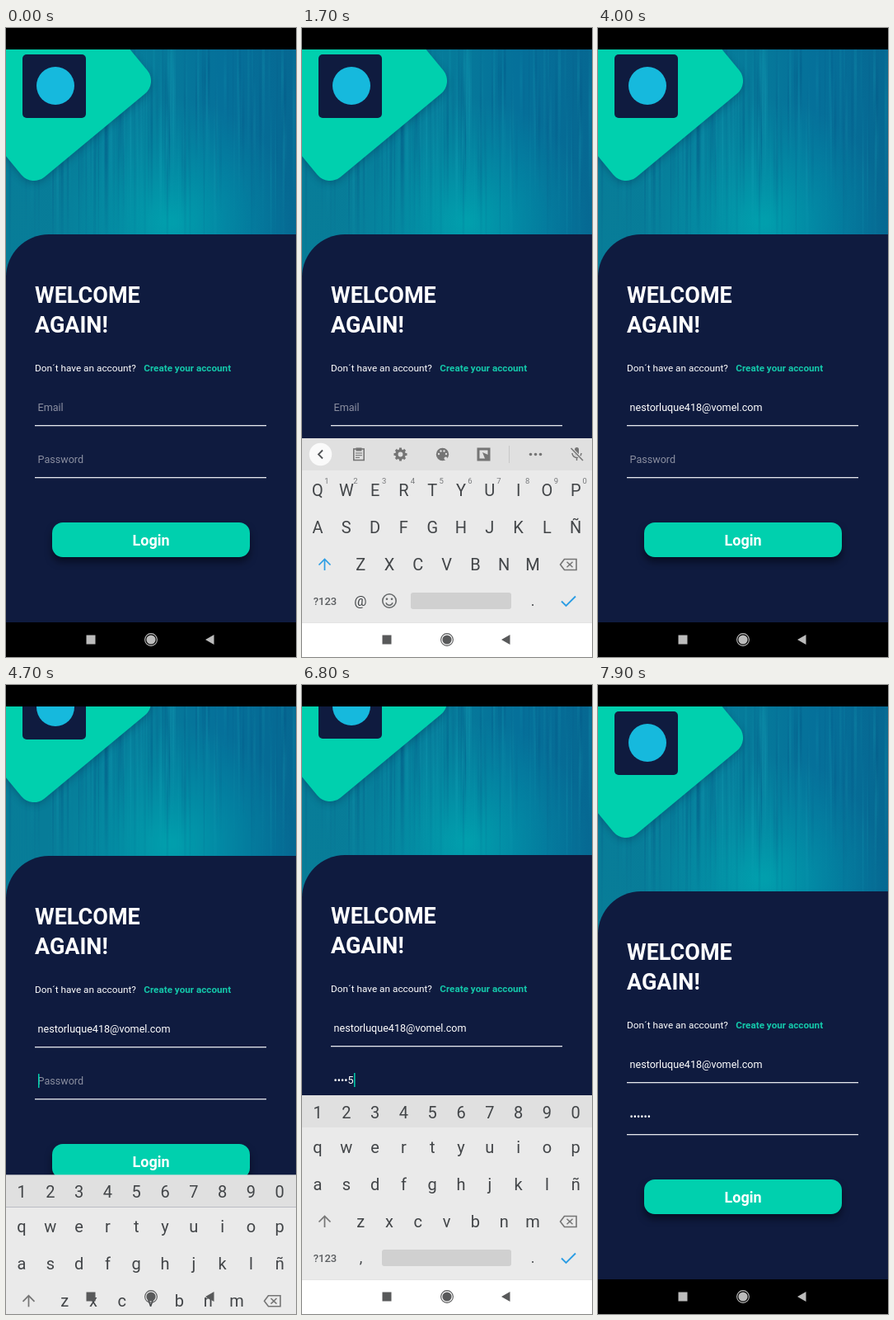
An HTML page with a canvas that plays this animation: 352x762 px, repeating every 8000 ms.

```html
<!DOCTYPE html>
<html lang="en">
<head>
<meta charset="utf-8">
<title>Login screen</title>
<style>
html, body { margin: 0; width: 100%; height: 100%; overflow: hidden; background: #000; }
canvas { display: block; width: 352px; height: 762px; }
</style>
</head>
<body>
<canvas id="stage" width="352" height="762"></canvas>
<script>
const W = 352, H = 762, LOOP = 8000;
const NAVY = '#0f1b3f', MINT = '#00d0ae', KEY = '#424548', ICON = '#757575', BLUE = '#2b9de4';
const USER = 'nestorluque418', HOST = '@vomel.com', EMAIL = USER + HOST;
const PIN = '123456';
const emailKeys = [1880, 2100, 2350], pickTime = 3080;
const pinKeys = [5450, 5700, 6000, 6400, 6760, 6880];
const KB_H = 265;

const ctx = document.getElementById('stage').getContext('2d');
let g = ctx;

const clamp = v => Math.max(0, Math.min(1, v));
const ramp = (t, a, b) => clamp((t - a) / (b - a));
const easeOut = u => 1 - (1 - u) * (1 - u);
const easeIn = u => u * u;
const smooth = u => u * u * (3 - 2 * u);

function text(s, x, y, size, color, weight = 400, align = 'left') {
  g.font = `${weight} ${size}px Roboto, sans-serif`;
  g.textAlign = align;
  g.fillStyle = color;
  g.fillText(s, x, y);
  return g.measureText(s).width;
}

function rect(x, y, w, h, color) {
  g.fillStyle = color;
  g.fillRect(x, y, w, h);
}

function round(x, y, w, h, r, color) {
  g.fillStyle = color;
  g.beginPath();
  g.roundRect(x, y, w, h, r);
  g.fill();
}

function disc(x, y, r, color) {
  g.fillStyle = color;
  g.beginPath();
  g.arc(x, y, r, 0, 7);
  g.fill();
}

function ring(x, y, r, color, w) {
  g.strokeStyle = color;
  g.lineWidth = w;
  g.beginPath();
  g.arc(x, y, r, 0, 7);
  g.stroke();
}

// Polyline from flat x,y pairs
function line(pts, color, w) {
  g.strokeStyle = color;
  g.lineWidth = w;
  g.beginPath();
  for (let i = 0; i < pts.length; i += 2) g.lineTo(pts[i], pts[i + 1]);
  g.stroke();
}

function shadow(color, blur, dy) {
  g.shadowColor = color;
  g.shadowBlur = blur;
  g.shadowOffsetY = dy;
}

function makeBackdrop() {
  const c = document.createElement('canvas');
  c.width = W;
  c.height = 300;
  const b = c.getContext('2d');
  let seed = 11;
  const rnd = () => (seed = (seed * 16807) % 2147483647) / 2147483647;
  const base = b.createLinearGradient(0, 0, W, 0);
  [[0, '#087d98'], [.5, '#067b9a'], [.75, '#05709a'], [1, '#066892']].forEach(s => base.addColorStop(...s));
  b.fillStyle = base;
  b.fillRect(0, 0, W, 300);
  const glow = b.createRadialGradient(200, 235, 5, 200, 235, 150);
  glow.addColorStop(0, 'rgba(0,165,176,.85)');
  glow.addColorStop(1, 'rgba(0,150,170,0)');
  b.fillStyle = glow;
  b.fillRect(0, 0, W, 300);
  for (let i = 0; i < 190; i++) {
    const x = rnd() * W, y = rnd() * 130 - 30, h = 90 + rnd() * 150;
    const rgb = rnd() < .55 ? '0,75,125' : '20,165,185';
    const s = b.createLinearGradient(0, y, 0, y + h);
    s.addColorStop(0, `rgba(${rgb},0)`);
    s.addColorStop(.45, `rgba(${rgb},${.08 + rnd() * .16})`);
    s.addColorStop(1, `rgba(${rgb},0)`);
    b.fillStyle = s;
    b.fillRect(x, y, 1 + rnd() * 2.5, h);
  }
  return c;
}
const backdrop = makeBackdrop();

function cursorOn(t, start, keys) {
  const last = [start, ...keys].filter(k => k <= t).pop();
  return last !== undefined && (t - last) % 1000 < 500;
}

function caret(x, base) {
  rect(x, base - 13, 1.5, 17, MINT);
}

function drawHeader() {
  g.drawImage(backdrop, 0, 0);
  g.save();
  g.translate(34, 165);
  g.rotate(-39.6 * Math.PI / 180);
  shadow('rgba(0,40,70,.3)', 8, 3);
  round(-20, -240, 198.4, 260, 20, MINT);
  g.restore();
  round(20, 32, 77, 77, 5, NAVY);
  disc(60, 70, 23, '#16b9dd');
}

function drawEmail(t) {
  const n = emailKeys.filter(k => k <= t).length;
  const done = t >= pickTime;
  const x = 38.5, y = 464;
  let w = 0;
  if (done) w = text(EMAIL, x, y, 12.6, '#fff');
  else if (n) {
    w = text('Nes'.slice(0, n), x, y, 12.6, '#fff');
    rect(x, 465.5, w, 1, '#fff');
  } else text('Email', x, y, 12.6, '#8b8fa0');
  if (t < 3600 && cursorOn(t, 850, [...emailKeys, pickTime])) caret(x + w + .5, y);
}

function drawPin(t) {
  const n = pinKeys.filter(k => k <= t).length;
  const x = 38.5, y = 527;
  let w = 0;
  if (n) {
    const open = t < 7500 && t - pinKeys[n - 1] < 1500;
    w = text('•'.repeat(open ? n - 1 : n) + (open ? PIN[n - 1] : ''), x, y, 12.6, '#fff');
  } else text('Password', x, y, 12.6, '#8b8fa0');
  if (t < 7500 && cursorOn(t, 4420, pinKeys)) caret(x + w + .5, y);
}

function drawForm(t) {
  round(0, 250, W + 60, 600, [52, 0, 0, 0], NAVY);
  text('WELCOME', 35, 333, 27, '#fff', 700);
  text('AGAIN!', 35, 369, 27, '#fff', 700);
  text('Don´t have an account?', 35, 416, 11.8, '#fff');
  text('Create your account', 167.3, 416, 11.7, '#14c9ab', 700);
  drawEmail(t);
  rect(35, 481, 281, 1.3, '#e6e8ee');
  drawPin(t);
  rect(35, 544, 281, 1.3, '#e6e8ee');
  g.save();
  shadow('rgba(0,0,10,.5)', 9, 6);
  round(56, 599, 240, 42, 13, MINT);
  g.restore();
  text('Login', 176, 627, 18, '#fff', 700, 'center');
}

function drawTools() {
  // clipboard
  g.strokeStyle = ICON;
  g.lineWidth = 1.6;
  g.strokeRect(62.8, 510, 12.4, 13.5);
  rect(65.5, 508.5, 7, 4, ICON);
  [515, 517.7, 520.4].forEach(y => line([65, y, y > 520 ? 70 : 73, y], ICON, 1.1));
  // gear
  ring(119.5, 516.5, 4.6, ICON, 3.4);
  for (let i = 0; i < 8; i++) {
    const a = i * Math.PI / 4, c = Math.cos(a), s = Math.sin(a);
    line([119.5 + c * 5, 516.5 + s * 5, 119.5 + c * 8, 516.5 + s * 8], ICON, 3);
  }
  // palette
  disc(170.5, 516.5, 7.7, ICON);
  [[166, 516], [168.5, 512.5], [172.5, 512.5], [175, 516]].forEach(p => disc(...p, 1.2, '#e0e0e0'));
  disc(174.5, 521.5, 2, '#e0e0e0');
  // sticker
  g.strokeStyle = ICON;
  g.strokeRect(214, 510, 13, 13);
  g.fillStyle = ICON;
  g.beginPath();
  [[219, 514], [228, 518], [228, 524], [223, 524]].forEach(p => g.lineTo(...p));
  g.fill();
  rect(251, 506, 1, 21, '#c8c8c8');
  [277.5, 283.5, 289.5].forEach(x => disc(x, 516.5, 1.8, ICON));
}

function drawMic() {
  round(331, 508, 5, 10, 2.5, ICON);
  g.strokeStyle = ICON;
  g.lineWidth = 1.5;
  g.beginPath();
  g.arc(333.5, 515, 5.5, 0, Math.PI);
  g.stroke();
  line([333.5, 520, 333.5, 524], ICON, 1.5);
  line([326.5, 509, 341, 524], '#e0e0e0', 3.5);
  line([326.5, 509, 341, 524], ICON, 1.5);
}

function drawSuggestions(t, n) {
  text('Nes'.slice(0, n), 78.5, 522.5, 16, '#4a4d50', 400, 'center');
  if (t >= 2880) rect(125, 497, 102, 39, '#c3c3c3');
  text(USER, 175, 510, 12.2, KEY, 500, 'center');
  text(HOST, 175, 525, 10.7, KEY, 400, 'center');
  text('nestor.luque', 271, 510, 12.6, KEY, 500, 'center');
  text('@trelun....com.co', 270, 525, 9.8, KEY, 400, 'center');
}

function drawKeys(caps, pin) {
  const keyX = i => 19 + i * 34.8;
  const row = (s, y, from) => [...s].forEach((c, i) =>
    text(caps ? c.toUpperCase() : c, keyX(i + from), y, 20, KEY, 400, 'center'));
  row('qwertyuiop', 567, 0);
  row('asdfghjklñ', 612, 0);
  row('zxcvbnm', 657, 1.5);
  [...'1234567890'].forEach((c, i) => pin
    ? text(c, keyX(i), 524.5, 20, KEY, 400, 'center')
    : text(c, keyX(i) + 11, 552, 9.5, '#77797b', 400, 'center'));

  const shift = caps ? BLUE : ICON;
  line([27.5, 657, 27.5, 644], shift, 1.7);
  line([20.5, 650.5, 27.5, 643.5, 34.5, 650.5], shift, 1.7);
  line([313.5, 650, 318.5, 643.5, 333, 643.5, 333, 656.5, 318.5, 656.5, 313.5, 650, 318.5, 643.5], ICON, 1.6);
  line([321.5, 646.7, 328.5, 653.3], ICON, 1.5);
  line([328.5, 646.7, 321.5, 653.3], ICON, 1.5);

  text('?123', 28, 699, 13, '#5a5d60', 500, 'center');
  if (pin) {
    text(',', 71.5, 700, 18, KEY, 400, 'center');
    round(97, 684, 157, 20, 3, '#d0d0d0');
  } else {
    text('@', 71, 700, 17, KEY, 400, 'center');
    ring(106, 694, 8.2, '#66696b', 1.6);
    disc(103, 691.8, 1.3, '#66696b');
    disc(109, 691.8, 1.3, '#66696b');
    g.beginPath();
    g.arc(106, 695, 4.2, .3, Math.PI - .3);
    g.stroke();
    round(132, 684, 122, 20, 3, '#d0d0d0');
  }
  text('.', 280, 700, 18, KEY, 400, 'center');
  line([315, 694.5, 320.5, 700, 332, 688.5], BLUE, 1.9);
}

function drawKeyboard(t, p) {
  const n = emailKeys.filter(k => k <= t).length;
  const pin = t > 4300, typing = n > 0 && t < pickTime;
  g.save();
  g.translate(0, (1 - p) * KB_H);
  rect(0, 497, W, 39, '#e0e0e0');
  rect(0, 536, W, 184, '#eaeaea');
  rect(0, 720, W, 42, '#fff');
  rect(0, 720, W, 1, '#e3e3e3');
  if (!pin) {
    disc(22.5, 516.5, 13.7, '#fafafa');
    const d = typing ? 1 : -1;
    line([22.5 - 2.5 * d, 511.5, 22.5 + 2.5 * d, 516.5, 22.5 - 2.5 * d, 521.5], '#505356', 1.8);
    if (typing) drawSuggestions(t, n);
    else drawTools();
    drawMic();
  }
  drawKeys(!n, pin);
  g.restore();
}

function drawNav(p) {
  const c = p > .1 ? '#58595a' : '#bcbcbc';
  rect(97.5, 735.5, 11, 11, c);
  disc(176, 741, 5.6, c);
  ring(176, 741, 7.4, c, 1.1);
  g.fillStyle = c;
  g.beginPath();
  [[242, 741], [252.5, 735], [252.5, 747]].forEach(q => g.lineTo(...q));
  g.fill();
}

function draw(t) {
  const p = t < 4300
    ? easeOut(ramp(t, 950, 1300)) - easeIn(ramp(t, 3640, 3980))
    : easeOut(ramp(t, 4562, 4912)) - easeIn(ramp(t, 7180, 7560));
  const pan = 44 * (easeOut(ramp(t, 4460, 4745)) - smooth(ramp(t, 7200, 7520)));
  rect(0, 0, W, H, '#000');
  g.save();
  g.beginPath();
  g.rect(0, 26, W, 694);
  g.clip();
  g.translate(0, -pan);
  drawHeader();
  drawForm(t);
  g.restore();
  if (p > 0) drawKeyboard(t, p);
  drawNav(p);
}

const start = performance.now();
function tick() {
  draw((performance.now() - start) % LOOP);
  requestAnimationFrame(tick);
}
tick();
</script>
</body>
</html>
```
